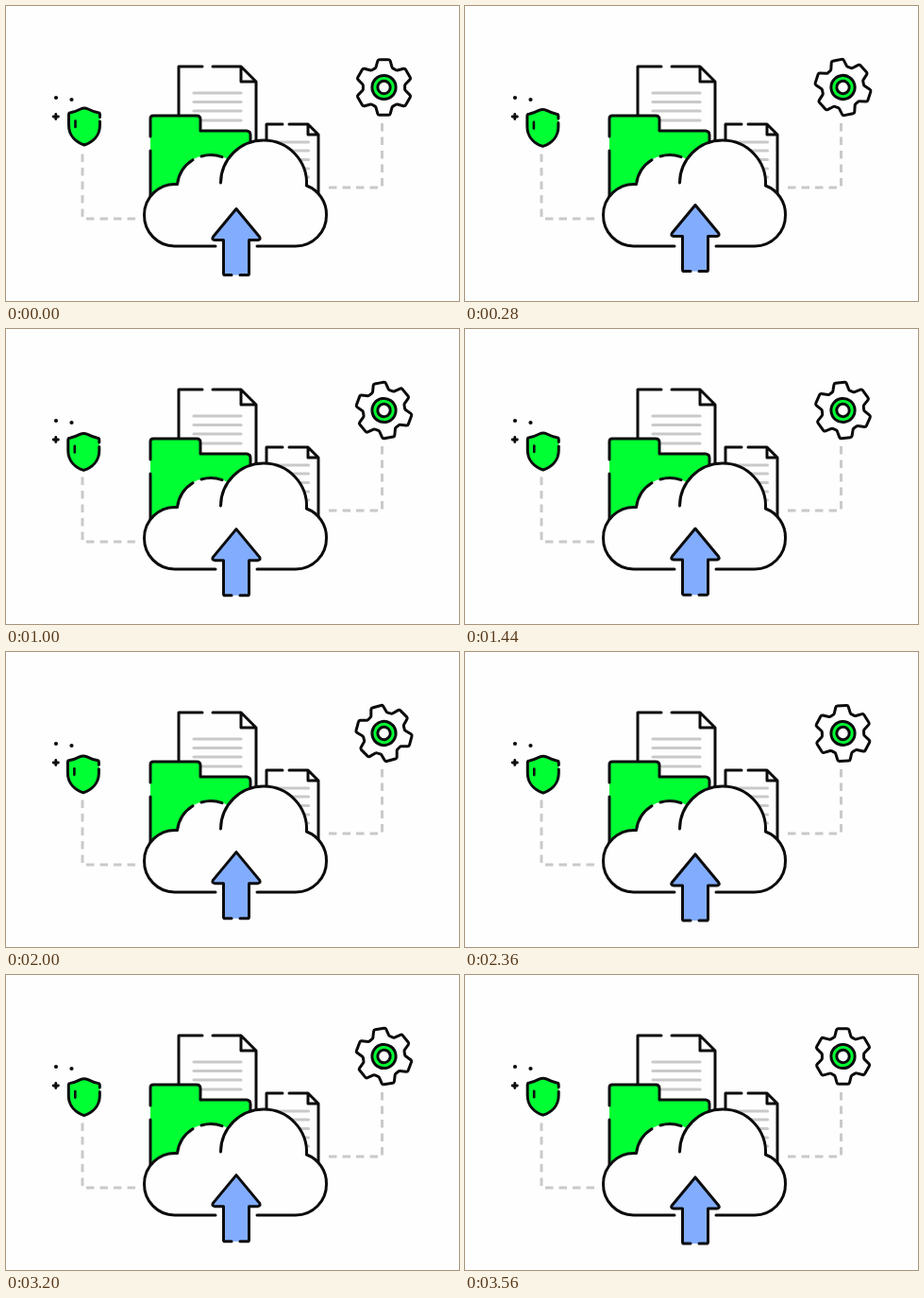
An HTML page with a canvas for the animation above (3.6 s loop, 480 by 312 pixels).

```html
<!DOCTYPE html>
<html lang="en">
<head>
<meta charset="utf-8">
<title>Cloud upload</title>
<style>
  html, body { margin: 0; width: 480px; height: 312px; overflow: hidden; background: #fefefe; }
  canvas { display: block; }
</style>
</head>
<body>
<canvas id="stage" width="480" height="312"></canvas>
<script>
const ctx = document.getElementById('stage').getContext('2d');
const LOOP = 3600, STEP = 40, ARROW_PERIOD = 600;
const INK = '#0c0c0e', GREEN = '#00ff33', BLUE = '#82adff', GRAY = '#c9c9c9', WHITE = '#fefefe';
const TAU = Math.PI * 2;

// Drift keys: [time, value, ...]
const SHIELD_KEYS = [[0, 0, 0], [560, -1.2, 2.8], [1440, -.2, 2], [2000, -1.1, 1.8], [2360, -.2, 2.1],
  [2880, -.1, 1.9], [3560, -.3, 1.2], [LOOP, 0, 0]];
const GEAR_KEYS = [[0, 0], [300, -12], [560, -6], [900, -13], [1160, -3], [1440, -6], [2000, -15],
  [2360, -2], [2880, -16], [3560, -.5], [LOOP, 0]];

function drift(keys, t) {
  const i = keys.findIndex(k => k[0] > t);
  const a = keys[i - 1], b = keys[i];
  const p = (t - a[0]) / (b[0] - a[0]);
  const e = p * p * (3 - 2 * p);
  return a.slice(1).map((v, n) => v + (b[n + 1] - v) * e);
}

function fill(path, color) {
  ctx.fillStyle = color;
  ctx.fill(new Path2D(path));
}

function stroke(path, color = INK, width = 3, dash = []) {
  ctx.strokeStyle = color;
  ctx.lineWidth = width;
  ctx.setLineDash(dash);
  ctx.stroke(new Path2D(path));
  ctx.setLineDash([]);
}

function disc(x, y, r, color, outline) {
  ctx.beginPath();
  ctx.arc(x, y, r, 0, TAU);
  ctx.fillStyle = color;
  ctx.fill();
  if (outline) {
    ctx.strokeStyle = INK;
    ctx.lineWidth = outline;
    ctx.stroke();
  }
}

function at(x, y, draw) {
  ctx.save();
  ctx.translate(x, y);
  draw();
  ctx.restore();
}

function connectors() {
  ctx.lineCap = 'butt';
  stroke('M81 156.5V225H137', GRAY, 3, [8.5, 6]);
  stroke('M398.5 124V192H337', GRAY, 3, [8.5, 6]);
  ctx.lineCap = 'round';
}

function documents() {
  fill('M183 64H249L265 80V160H183Z', WHITE);
  for (const y of [92, 101.5, 111, 121]) stroke(`M199 ${y}H249`, GRAY, 3.2);
  stroke('M183 140V64H208M219 64H249L265 80V150M249 64V80H265');

  fill('M276 125H320L331 136V215H276Z', WHITE);
  for (const y of [144, 153, 162.5, 172, 181]) stroke(`M288 ${y}H320.5`, GRAY, 3.2);
  stroke('M276 160V125H293M300 125H320L331 136V200M320 125V136H331');
}

function folder() {
  const top = 'V119Q153 116 156 116H202Q206 116 206 120V132H255Q259 132.5 259 136.5';
  fill(`M153 210${top}V210Z`, GREEN);
  stroke(`M153 138${top}V160M153 153V210`);
}

function cloud() {
  const leftLobe = 'H178.5A32.5 32.5 0 0 1 146.5 221A32.5 32.5 0 0 1 181.5 188.5';
  const rightSide = 'A45.5 45.5 0 0 1 273 142A45.5 45.5 0 0 1 318.5 190A32.5 32.5 0 0 1 339.5 221A32.5 32.5 0 0 1 307 254';
  const bump = 'A35.5 35.5 0 0 1';
  fill(`M222 254${leftLobe}${bump} 239 165L227.5 187${rightSide}Z`, WHITE);
  stroke(`M222 254${leftLobe}${bump} 198 162.8M207 159A35.5 35.5 0 0 1 229 159.7M227.5 187${rightSide}H266`);
}

function arrow(t) {
  const phase = t % ARROW_PERIOD / ARROW_PERIOD;
  const lift = 4.3 * (1 - Math.abs(1 - 2 * phase));
  at(0, -lift, () => {
    const left = 'M239 284.6H232Q230.5 284.6 230.5 283V247.5H221Q217.5 247 219.5 244L244 214.5';
    const right = 'L268.5 244Q270.5 247 267 247.5H257.5V283Q257.5 284.6 256 284.6H248';
    fill(left + right + 'Z', BLUE);
    stroke(left + right);
  });
}

function shield(t) {
  const [x, y] = drift(SHIELD_KEYS, t);
  at(x, y, () => {
    const outline = 'M99.5 122V126C99.5 137 92 144 83 147C74 144 66.5 137 66.5 126V115' +
      'Q66.5 113 68.5 112.8C73 112 76 110.5 79 109Q83 107.2 87 109C90 110.5 93 112 97.5 112.8Q99.5 113 99.5 115V117.5';
    fill(outline + 'Z', GREEN);
    stroke(outline);
    stroke('M73.5 121.5V128', INK, 2.6);
  });
}

function sparkles() {
  disc(53, 97, 2.1, INK);
  disc(69.5, 99, 2.1, INK);
  stroke('M50.2 117H55.4M52.8 114.4V119.6', INK, 2.8);
}

function gear(t) {
  const [angle] = drift(GEAR_KEYS, t);
  const tooth = [[-8.7, -20.5], [-6.3, -29.3], [6.3, -29.3], [8.7, -20.5]];
  const points = [];
  for (let i = 0; i < 6; i++) {
    const c = Math.cos(i * TAU / 6), s = Math.sin(i * TAU / 6);
    for (const [x, y] of tooth) points.push([x * c - y * s, x * s + y * c]);
  }
  at(400.5, 86, () => {
    ctx.rotate(angle * TAU / 360);
    ctx.beginPath();
    ctx.moveTo(0, -29.3);
    for (let i = 2; i < points.length + 2; i++) {
      const p = points[i % points.length], q = points[(i + 1) % points.length];
      ctx.arcTo(...p, ...q, 2);
    }
    ctx.closePath();
    ctx.fillStyle = WHITE;
    ctx.fill();
    ctx.strokeStyle = INK;
    ctx.lineWidth = 3;
    ctx.stroke();
    disc(0, 0, 12.6, GREEN, 3);
    disc(0, 0, 6.7, WHITE, 3);
  });
}

function render(now) {
  const t = Math.floor(now % LOOP / STEP) * STEP;
  ctx.fillStyle = WHITE;
  ctx.fillRect(0, 0, 480, 312);
  ctx.lineCap = ctx.lineJoin = 'round';
  connectors();
  documents();
  folder();
  cloud();
  arrow(t);
  shield(t);
  sparkles();
  gear(t);
}

const start = performance.now();
function tick() {
  render(performance.now() - start);
  requestAnimationFrame(tick);
}
tick();
</script>
</body>
</html>
```
